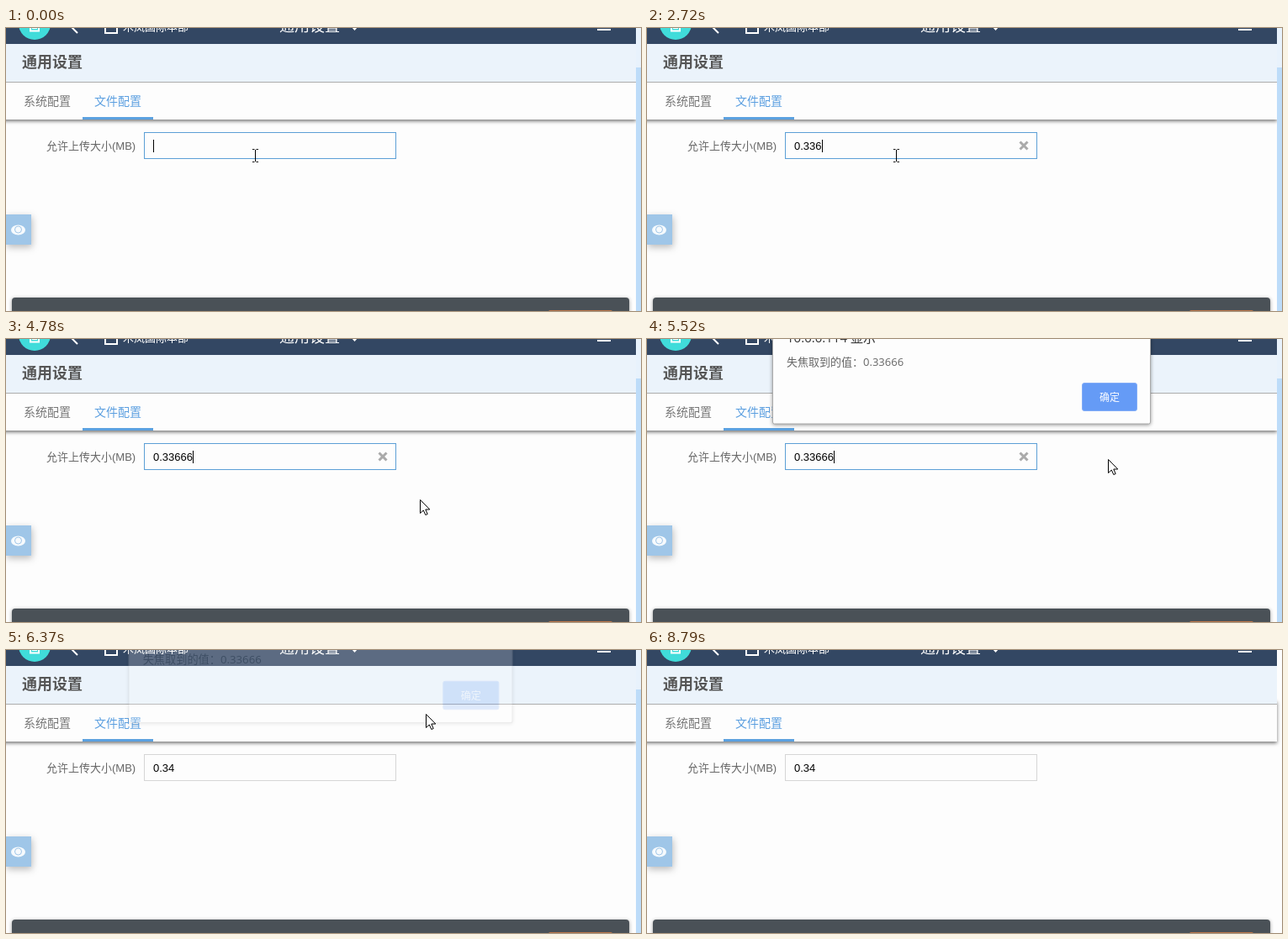
Write an HTML page that moves like this. It is 755 px wide and 337 px high and loops after 8890 ms.

```html
<!DOCTYPE html>
<html lang="zh-CN">
<head>
<meta charset="utf-8">
<title>通用设置</title>
<style>
  html, body { margin: 0; width: 100%; height: 100%; overflow: hidden; background: #fdfdfd; }
  svg { display: block; width: 100%; height: 100%; }
  text { font: 13px "Liberation Sans", "Noto Sans CJK SC", sans-serif; white-space: pre; }
  .t14 { font-size: 14px; }
  .t18 { font-size: 18px; }
  .bold { font-weight: 700; }
  #dialog text { font-family: "Open Sans", "Noto Sans CJK SC", sans-serif; }
  .bar { filter: drop-shadow(0 2px 2px #0008); }
  .glow { filter: drop-shadow(1px 3px 4px #0004); }
  .edge { filter: drop-shadow(0 1px 2px #0006); }
  .line { fill: none; stroke: #fff; stroke-width: 2; }
</style>
</head>
<body>
<svg viewBox="0 0 755 337" preserveAspectRatio="none">
  <rect width="755" height="337" fill="#fdfdfd"/>

  <!-- tabs -->
  <rect class="bar" x="-10" y="60" width="759" height="49" fill="#fdfdfd"/>
  <text class="t14" x="21" y="92" fill="#777">系统配置</text>
  <text class="t14" x="105" y="92" fill="#5b9fe0">文件配置</text>
  <rect x="91" y="106" width="84" height="3" fill="#5ba1e0"/>

  <!-- page title -->
  <rect y="19" width="749" height="45" fill="#ebf3fb"/>
  <rect y="64" width="749" height="1" fill="#acacac"/>
  <text class="t18 bold" x="19" y="47" fill="#555">通用设置</text>

  <!-- top bar -->
  <rect width="749" height="19" fill="#334763"/>
  <circle cx="34" cy="-5" r="19" fill="#40dcda"/>
  <path class="line" d="M29 -4V3.500H39V-4M31 0H37"/>
  <path class="line" d="M76 -3L85 6M118 -8V6H132V-8"/>
  <text x="139" y="3" fill="#fff">木岚国际本部</text>
  <text class="t18" x="325" y="4" fill="#fff">通用设置</text>
  <path d="M410 -2H419L414.500 3Z" fill="#fff"/>
  <rect x="703" y="1" width="16" height="2" fill="#fff"/>

  <!-- form -->
  <text x="48" y="145" fill="#666">允许上传大小(MB)</text>
  <rect id="field" x="164.500" y="124.500" width="299" height="31" fill="#fdfdfd"/>
  <text id="value" x="175" y="145"></text>
  <rect id="caret" y="133" width="1" height="15"/>
  <path id="clear" d="M443.500 135.500L452.500 144.500M452.500 135.500L443.500 144.500" stroke="#aaa" stroke-width="3"/>

  <!-- preview button -->
  <rect class="glow" y="222" width="30" height="36" fill="#9fc6e8"/>
  <ellipse cx="14.500" cy="240.500" rx="8.500" ry="6" fill="#f6fafd"/>
  <circle cx="14.500" cy="240" r="4" fill="none" stroke="#9fc6e8"/>

  <!-- bottom bar -->
  <rect class="edge" x="7" y="321" width="734" height="40" rx="4" fill="#4a5157"/>
  <rect x="645" y="336" width="76" height="20" rx="2" fill="#b9754a"/>

  <g id="scroll">
    <rect x="749" width="6" height="337" fill="#e8f2fc"/>
    <rect x="749" y="47" width="6" height="290" fill="#bddcf9"/>
  </g>

  <g id="dialog">
    <rect class="edge" x="149.500" y="-40" width="449" height="141" rx="2" fill="#fdfdfd" stroke="#aaa"/>
    <text x="166" y="4" fill="#333" style="font-size:15px">10.0.0.114 显示</text>
    <text x="166" y="32" fill="#666">失焦取到的值：0.33666</text>
    <rect x="517.500" y="52.500" width="65" height="33" rx="2.500" fill="#659bf6" stroke="#82adf7"/>
    <text x="550" y="74" fill="#fff" text-anchor="middle" style="font-size:12px">确定</text>
  </g>

  <path id="arrow" d="M.5 .5V16.500L4.300 13L6.800 18.500L9.200 17.500L6.800 12H11.800Z" fill="#fff" stroke="#000"/>
  <path id="beam" d="M-3 -7.500H-.5M1.500 -7.500H4M.5 -7V7M-3 7.500H-.5M1.500 7.500H4" fill="none" stroke="#000"/>
</svg>
<script>
const LOOP = 8890;
const MOVE_START = 4110, STEP = 140.4;   // the pointer is redrawn once per STEP
const OPEN = 5, CLOSE = 15;              // dialog, in pointer steps
const KEY_TIMES = [550, 1110, 1540, 2100, 2720, 3120, 3520];

const [field, value, caret, clear, scroll, dialog, arrow, beam] =
  ["field", "value", "caret", "clear", "scroll", "dialog", "arrow", "beam"]
    .map(id => document.getElementById(id));

// Corners of the pointer's path: step, x, y
const path = [[0, 310, 151], [OPEN, 538, 201], [7, 540, 201], [10, 548, 143], [13, 556, 67],
  [CLOSE, 556, 67], [22, 159, 133], [23, 177, 150], [26, 430, 133], [30, 700, 360]];

function pointerAt(step) {
  if (step < 0) return [296, 152];
  const next = path.findIndex(corner => corner[0] > step);
  if (next < 0) return path.at(-1).slice(1);
  const [s0, x0, y0] = path[next - 1], [s1, x1, y1] = path[next];
  const k = (step - s0) / (s1 - s0);
  return [x0 + (x1 - x0) * k, y0 + (y1 - y0) * k].map(Math.round);
}

function dialogOpacity(step) {
  if (step < CLOSE) return Math.min(1, Math.max(0, (step - OPEN + 1) / 2));
  return Math.max(0, 0.8 - 0.6 * (step - CLOSE));
}

const show = (node, on) => node.setAttribute("visibility", on ? "visible" : "hidden");
const move = (node, x, y) => node.setAttribute("transform", `translate(${x} ${y})`);

function draw(t) {
  const step = Math.floor((t - MOVE_START) / STEP);
  const [x, y] = pointerAt(step);
  const focused = step < CLOSE;
  const typed = KEY_TIMES.filter(time => time <= t).length;
  const inRow = y > 124 && y < 156 && x < 464;
  const overField = inRow && x > 164;

  value.textContent = focused ? "0.33666".slice(0, typed) : "0.34";
  field.setAttribute("stroke", focused ? "#5c9fd6" : "#d6d6d6");
  caret.setAttribute("x", Math.round(175 + value.getComputedTextLength()));
  show(caret, focused && (step < 0 || step > 3));
  show(clear, typed && (focused || inRow));
  show(scroll, t < LOOP - 100);

  const opacity = dialogOpacity(step), faded = 1 - opacity;
  dialog.setAttribute("opacity", opacity);
  dialog.setAttribute("transform",
    `translate(374 ${-18 * Math.sqrt(faded)}) scale(${1 + 0.02 * faded}) translate(-374 0)`);

  show(beam, overField);
  show(arrow, !overField);
  move(overField ? beam : arrow, x, y);
}

function tick() {
  draw(performance.now() % LOOP);
  requestAnimationFrame(tick);
}
tick();
</script>
</body>
</html>
```
